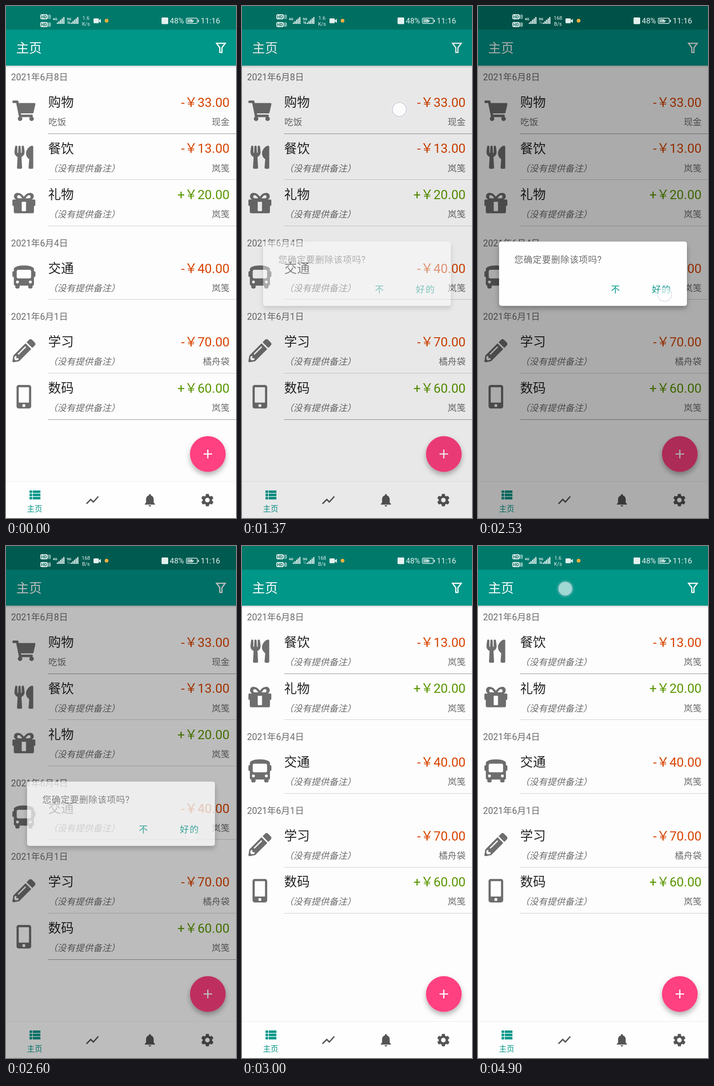
These frames come from a looping animation (502 by 1116 pixels, 4930 ms). An HTML page:

```html
<!DOCTYPE html>
<html lang="zh-CN">
<head>
<meta charset="utf-8">
<style>
html, body { margin: 0; width: 100%; height: 100%; overflow: hidden; background: #fdfdfd; }
svg { display: block; width: 502px; height: 1116px; font-family: Roboto, "Noto Sans CJK SC", "Noto Sans CJK", sans-serif; }
.big { font-size: 27.9px; }
.small { font-size: 19.5px; fill: #6c6c6c; }
.end { text-anchor: end; }
.mid { text-anchor: middle; }
.tiny { font-size: 11px; }
.bold { font-weight: 700; }
.medium { font-weight: 500; }
</style>
</head>
<body>
<svg viewBox="0 0 502 1116">
  <defs>
    <filter id="shadow" x="-30%" y="-30%" width="160%" height="170%"><feDropShadow dx="0" dy="6" stdDeviation="6" flood-opacity=".3"/></filter>
    <radialGradient id="halo"><stop offset=".65" stop-color="#fff" stop-opacity=".35"/><stop offset="1" stop-color="#fff" stop-opacity="0"/></radialGradient>
    <linearGradient id="edge" x2="0" y2="1"><stop stop-opacity=".16"/><stop offset="1" stop-opacity="0"/></linearGradient>
  </defs>
  <rect width="502" height="1116" fill="#fdfdfd"/>
  <g id="before"></g>
  <g id="after"></g>
  <rect width="502" height="52" fill="#00796b"/>
  <rect y="51.5" width="502" height="78.5" fill="#009688"/>
  <rect y="130" width="502" height="5" fill="url(#edge)"/>
  <text class="big medium" x="22.3" y="102" fill="#fff">主页</text>
  <path d="M459.6 81.3H478.4L471.3 91V101.3H466.7V91Z" fill="none" stroke="#fff" stroke-width="2.6"/>
  <g filter="url(#shadow)"><circle cx="440.5" cy="976.5" r="39" fill="#ff4081"/></g>
  <path d="M431 976.5h19M440.5 967v19" stroke="#fff" stroke-width="2.7"/>
  <path d="M0 1036.5H502" stroke="#ececec"/>
  <rect y="1037" width="502" height="79" fill="#fefefe"/>
  <g id="nav"></g>
  <text class="mid" x="62.5" y="1102" font-size="16.7" fill="#009688">主页</text>
  <rect id="dim" width="502" height="1116"/>
  <g id="dialog">
    <rect x="46" y="513.5" width="410" height="140" rx="5" fill="#fefefe" filter="url(#shadow)"/>
    <text class="small" x="79.3" y="560.3" letter-spacing=".61">您确定要删除该项吗?</text>
    <g class="medium" font-size="19.5" fill="#009688" letter-spacing="1.74">
      <text x="290" y="625">不</text><text x="379.6" y="625">好的</text>
    </g>
  </g>
  <g id="status" fill="#e4f1ef"></g>
  <g id="touch">
    <circle r="21" fill="url(#halo)"/>
    <circle r="15.3" fill="#fff" fill-opacity=".78" stroke="#a0a8c4" stroke-opacity=".55" stroke-width="1.6"/>
  </g>
</svg>
<script>
const LOOP = 4930;
const $ = id => document.getElementById(id);

// Each icon: scale, x offset, y offset, path
const icons = {
  cart: [.0872, 0, 2, "M528 301l47-208C579 78 567 64 552 64H159l-9-45C148 8 138 0 127 0H24C11 0 0 11 0 24v16c0 13 11 24 24 24h70l70 343C147 417 136 435 136 456c0 31 25 56 56 56s56-25 56-56c0-16-6-30-17-40h210C430 426 424 440 424 456c0 31 25 56 56 56s56-25 56-56c0-22-13-41-32-50l6-25c3-15-8-29-23-29H218l-7-32h294c11 0 21-8 23-19z"],
  cutlery: [.0985, 4.5, 0, "M208 15c1 5 16 95 16 129 0 52-28 90-69 105L168 487c1 14-10 25-24 25H80c-14 0-25-12-24-25l13-238C28 234 0 196 0 144 0 110 15 20 16 15 19-5 61-5 64 16v141c1 4 15 4 16 0 1-25 8-139 8-141 3-21 45-21 48 0 0 3 7 116 8 141 1 4 15 4 16 0V16c3-21 45-21 48-1zm119 286l-15 185c-1 14 10 26 24 26h56c13 0 24-11 24-24V24c0-13-11-24-24-24-82 0-221 179-65 301z"],
  gift: [1, 0, 0, "M2 17H8A7.5 7.5 0 0 1 14 3Q19 3 25 11Q31 3 36 3A7.500 7.500 0 0 1 42 17H48Q50 17 50 19V29Q50 31 47 31V43.500Q47 47 43.500 47H6.500Q3 47 3 43.500V31Q0 31 0 29V19Q0 17 2 17ZM14 7.500A3.500 3.500 0 0 0 14 14.500H21.500Q17 7.500 14 7.500ZM36 7.500Q33 7.500 28.500 14.500H36A3.500 3.500 0 0 0 36 7.500ZM20.300 22V41Q20.300 42.500 22 42.500H28Q29.700 42.500 29.700 41V22Z"],
  bus: [.098, 0, 0, "M488 128h-8V80c0-45-99-80-224-80S32 35 32 80v48h-8c-13 0-24 11-24 24v80c0 13 11 24 24 24h8v160c0 18 14 32 32 32v32c0 18 14 32 32 32h32c18 0 32-14 32-32v-32h192v32c0 18 14 32 32 32h32c18 0 32-14 32-32v-32h6c16 0 26-13 26-26V256h8c13 0 24-11 24-24v-80c0-13-11-24-24-24zM112 400a32 32 0 1 1 0-64a32 32 0 1 1 0 64zM128 288c-18 0-32-14-32-32V128c0-18 14-32 32-32h256c18 0 32 14 32 32v128c0 18-14 32-32 32zM400 400a32 32 0 1 1 0-64a32 32 0 1 1 0 64z"],
  pencil: [.098, 0, 0, "M498 142l-46 46c-5 5-12 5-17 0l-111-111c-5-5-5-12 0-17l46-46c19-19 49-19 68 0l60 60c19 19 19 49 0 68zM284 100L22 362 0 484c-3 16 11 31 28 28l122-22 262-262c5-5 5-12 0-17l-111-111c-5-5-12-5-17 0zM124 340c-5-5-5-14 0-20l154-154c6-5 14-5 20 0s5 14 0 20l-154 154c-6 5-14 5-20 0zM88 424h48v36l-64 12-32-32L52 376H88z"],
  phone: [.1, 9, -.5, "M272 0H48C22 0 0 22 0 48v416c0 26 22 48 48 48h224c26 0 48-22 48-48V48c0-26-22-48-48-48zM160 480a32 32 0 1 1 0-64a32 32 0 1 1 0 64zM272 372c0 7-5 12-12 12H60c-7 0-12-5-12-12V60c0-7 5-12 12-12h200c7 0 12 5 12 12z"]
};

const noNote = "（没有提供备注）";
const days = [
  ["2021年6月8日", [["cart", "购物", -33, "现金", "吃饭"], ["cutlery", "餐饮", -13, "岚笺"], ["gift", "礼物", 20, "岚笺"]]],
  ["2021年6月4日", [["bus", "交通", -40, "岚笺"]]],
  ["2021年6月1日", [["pencil", "学习", -70, "橘舟袋"], ["phone", "数码", 60, "岚笺"]]]
];

const icon = ([s, x, y, d], left, top) =>
  `<path transform="translate(${left + x} ${top + y}) scale(${s})" d="${d}" fill-rule="evenodd"/>`;

function row([kind, name, sum, account, note], line) {
  const y = Math.floor(line) + .5;
  const dark = y < 300 || y > 900;
  const amount = (sum < 0 ? "-" : "+") + "￥" + Math.abs(sum).toFixed(2);
  return `<g fill="#6e6e6e">${icon(icons[kind], 14, line - 74.5)}</g>
    <text class="big" x="92" y="${line - 58.3}" fill="#222">${name}</text>
    <text class="big end" x="488" y="${line - 58.5}" fill="${sum < 0 ? "#d84300" : "#5a9600"}">${amount}</text>
    <text class="small" x="92.500" y="${line - 18.3}" ${note ? "" : 'font-style="italic"'}>${note || noNote}</text>
    <text class="small end" x="488" y="${line - 18.3}">${account}</text>
    <path d="M92 ${y}H502" stroke="${dark ? "#8e8e8e" : "#cbcbd6"}"/>`;
}

function list(skip) {
  let y = 117.8, out = "";
  days.forEach(([date, items], i) => {
    out += `<text class="small" x="11" y="${y + 44.2}">${date}</text>`;
    y += 60.3;
    for (const item of i ? items : items.slice(skip)) out += row(item, y += 100.4);
  });
  return out;
}

const navIcon = (cx, color, d) => `<g fill="${color}">${icon([1.395, 0, 0, d], cx - 16.7, 1060.3)}</g>`;
$("nav").innerHTML =
  `<g transform="translate(0 -11.3)">${navIcon(62.500, "#009688", "M4 14h4v-4H4zM4 19h4v-4H4zM4 9h4V5H4zM9 14h12v-4H9zM9 19h12v-4H9zM9 5v4h12V5z")}</g>` +
  navIcon(188.500, "#555", "M3.500 18.490l6-6.010 4 4L22 6.920l-1.410-1.410-7.090 7.970-4-4L2 16.990z") +
  navIcon(314, "#555", "M12 22c1.100 0 2-.9 2-2h-4c0 1.100.9 2 2 2zM18 16v-5c0-3.070-1.640-5.640-4.500-6.320V4a1.500 1.500 0 0 0-3 0v.68C7.630 5.360 6 7.920 6 11v5l-2 2v1h16v-1z") +
  navIcon(439.500, "#555", gear());

function gear() {
  const point = (r, a) => `${(12 + r * Math.cos(a)).toFixed(2)} ${(12 + r * Math.sin(a)).toFixed(2)}`;
  let d = "";
  for (let i = 0; i < 6; i++) {
    const a = i * Math.PI / 3 + Math.PI / 6;
    for (const [r, off] of [[7.3, -.4], [9.9, -.22], [9.900, .22], [7.3, .4]]) d += (d ? "L" : "M") + point(r, a + off);
  }
  return d + "ZM12 15.600a3.600 3.600 0 1 1 0-7.200a3.600 3.600 0 1 1 0 7.200z";
}

const hd = (n, y) => `<rect x="75" y="${y}" width="16" height="11" rx="3"/>
  <text class="mid bold" x="83" y="${y + 9}" font-size="9.500" fill="#00695c">HD</text>
  <rect x="92.500" y="${y + 1.5}" width="4.500" height="8" rx="1" fill="none" stroke="#e4f1ef"/>
  <text class="mid bold" x="94.800" y="${y + 8}" font-size="6.500">${n}</text>`;
const signal = (name, x) => `<text class="bold" x="${x - 9}" y="30.500" font-size="8">${name}</text>` +
  [3, 6, 9, 12, 15].map((h, i) => `<rect x="${x + i * 3.5}" y="${39 - h}" width="2.500" height="${h}"/>`).join("");
$("status").innerHTML = hd(1, 18) + hd(2, 35) + signal("4G", 111) + signal("5G", 141.500) +
  `<path id="arrows" d="M135.500 39v-5M138.500 33.500v5M134 35.500l1.500-2 1.500 2M137 37l1.500 2 1.500-2" fill="none" stroke="#e4f1ef"/>
  <text id="rate" class="tiny mid" x="174.500" y="29.500"></text>
  <text id="unit" class="tiny mid" x="174.500" y="42.500"></text>
  <rect x="191" y="27" width="11.500" height="10.500" rx="1.500"/><path d="M202 32l5-4v9l-5-4z"/>
  <circle cx="219.500" cy="32" r="4" fill="#ffb13b"/>
  <rect x="339.500" y="25" width="14.500" height="14.500" rx="2"/>
  <text x="357.500" y="38.300" font-size="16.700">48%</text>
  <rect x="393.500" y="26.500" width="24" height="11.500" rx="2.500" fill="none" stroke="#e4f1ef" stroke-width="1.300"/>
  <rect x="395.500" y="28.500" width="10" height="7.500" opacity=".65"/>
  <path d="M407 28l-6 5h5l-1 4 6-5.500h-5zM419 30h2v5h-2z"/>
  <text x="425" y="38.300" font-size="17">11:16</text>`;
$("before").innerHTML = list(0);
$("after").innerHTML = list(1);

const ramp = (t, a, b) => Math.min(1, Math.max(0, (t - a) / (b - a)));
// start, end, x, y
const touches = [[820, 1720, 343.5, 225.5], [2470, 2610, 407.5, 628.5], [4835, 5100, 190.5, 93]];

function draw(t) {
  const show = (id, v) => $(id).setAttribute("opacity", v);
  const deleted = t >= 2610;
  show("before", deleted ? 0 : 1);
  show("after", deleted ? 1 : 0);
  show("dim", .32 * (ramp(t, 1330, 1490) - ramp(t, 2575, 2702)));
  show("dialog", ramp(t, 1335, 1415) - ramp(t, 2575, 2672));
  const slow = t >= 1440 && t < 4430;
  $("rate").textContent = slow ? "168" : "1.6";
  $("unit").textContent = slow ? "B/s" : "K/s";
  show("arrows", slow ? .4 : 1);
  const hit = touches.find(([a, b]) => t >= a && t < b);
  show("touch", hit ? Math.min(ramp(t, hit[0], hit[0] + 90), 1 - ramp(t, hit[1] - 70, hit[1])) : 0);
  if (hit) $("touch").setAttribute("transform", `translate(${hit[2]} ${hit[3]})`);
}

const start = performance.now();
function tick() {
  draw((performance.now() - start) % LOOP);
  requestAnimationFrame(tick);
}
tick();
</script>
</body>
</html>
```
